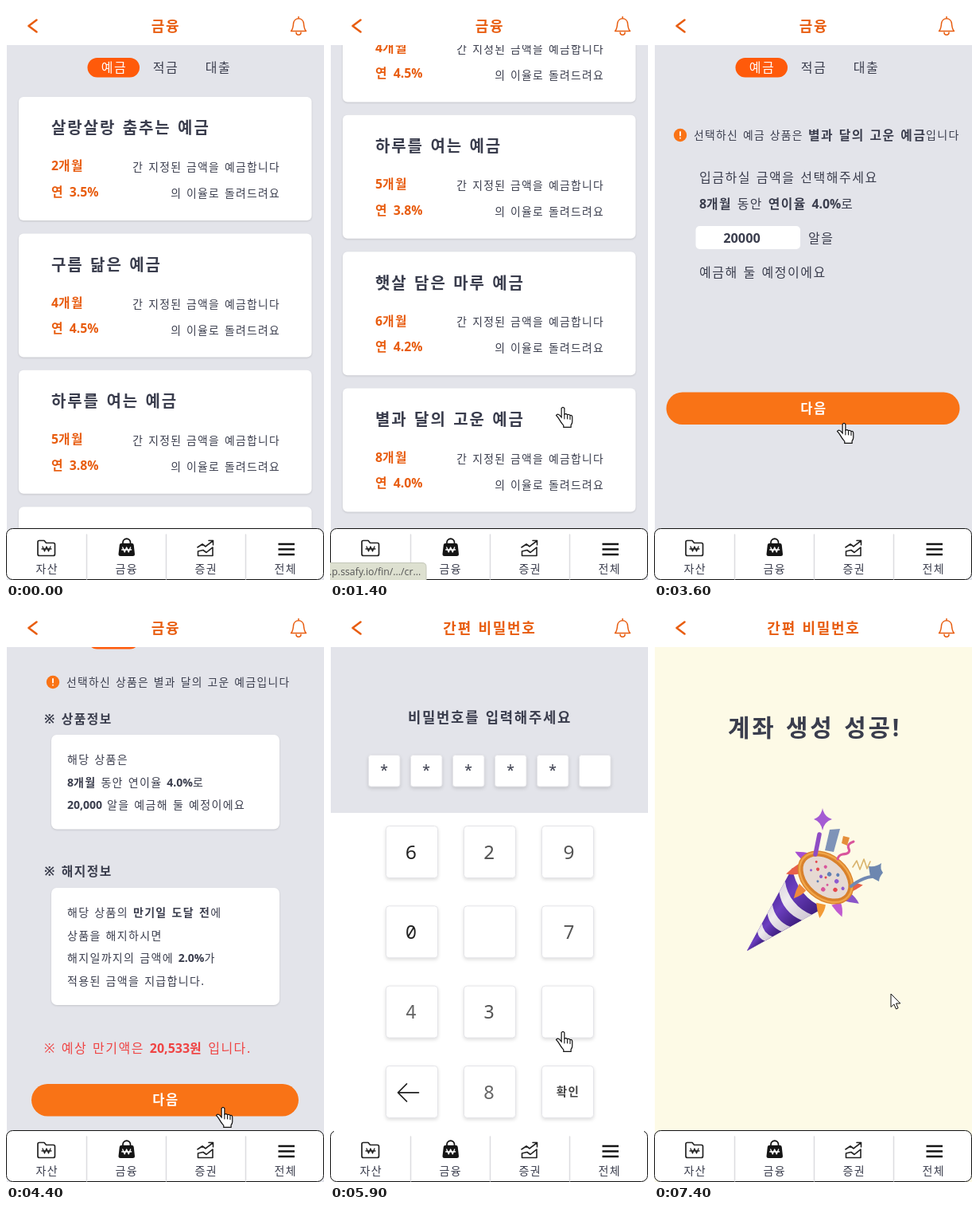
Animation, 400 px wide and 720 px high, one loop 7500 ms. Source, as an HTML page:

```html
<!DOCTYPE html>
<html lang="ko">
<head>
<meta charset="utf-8">
<style>
html, body { margin: 0; width: 100%; height: 100%; overflow: hidden; background: #fff; }
svg { display: block; width: 400px; height: 720px; }
text {
  font-family: "Noto Sans", "Noto Sans CJK KR", "Noto Sans KR", sans-serif;
  letter-spacing: .095em; word-spacing: .07em; white-space: pre;
}
.mono { font-family: "Noto Sans Mono", "Noto Sans CJK KR", monospace; letter-spacing: 0; }
.tip { font-family: "Open Sans", sans-serif; letter-spacing: 0; }
.card { fill: #fff; filter: drop-shadow(0 1px 1px #0002); }
.key { fill: #fff; stroke: #e4e4e8; filter: drop-shadow(0 2px 2px #0002); }
</style>
</head>
<body>
<svg id="stage" viewBox="0 0 400 720"></svg>
<script>
const LOOP = 7500;
const INK = '#3a3d4d', ORANGE = '#e85d10', BUTTON = '#f97316', GRAY = '#e3e4ea';
const PRODUCT = '별과 달의 고운 예금';

// y is the visual middle of the line; [brackets] mark bold, digits are set tight
function text(s, x, y, size, { fill = INK, bold = false, anchor = 'start', cls = '' } = {}) {
  const body = s
    .replace(/[\d.,%]+/g, '<tspan letter-spacing="0">$&</tspan>')
    .replace(/\[(.+?)\]/g, '<tspan font-weight="700">$1</tspan>');
  return `<text x="${x}" y="${y + size * .37}" font-size="${size}" fill="${fill}" class="${cls}"
    font-weight="${bold ? 700 : 400}" text-anchor="${anchor}">${body}</text>`;
}
const mid = (s, x, y, size, opt) => text(s, x, y, size, { anchor: 'middle', ...opt });
const rect = (x, y, w, h, r, attrs) =>
  `<rect x="${x}" y="${y}" width="${w}" height="${h}" rx="${r}" ${attrs}/>`;
const path = (d, attrs) => `<path d="${d}" ${attrs}/>`;
const line = (color, width) =>
  `fill="none" stroke="${color}" stroke-width="${width}" stroke-linecap="round" stroke-linejoin="round"`;
const group = (id, body) => `<g id="${id}">${body}</g>`;

const backdrop = rect(1, 49, 399, 671, 0, `fill="${GRAY}"`);
const tabs = rect(102.5, 65, 65.5, 24.5, 12.2, 'fill="#ff5a0a"') +
  mid('예금', 136, 77, 16, { fill: '#fff' }) + mid('적금', 201, 77, 16) + mid('대출', 267, 77, 16);
const notice = (x, y) => `<circle cx="${x}" cy="${y}" r="8.2" fill="${BUTTON}"/>` +
  path(`M${x} ${y - 4}v4.5M${x} ${y + 3.6}v.1`, line('#fff', 1.8));
const button = (x, y, w) => rect(x, y, w, 40.5, 20.2, `fill="${BUTTON}"`) +
  mid('다음', 201, y + 20, 16.5, { fill: '#fff', bold: true });

function productCard([name, months, rate], i) {
  const y = 114 + i * 171.4;
  const accent = { fill: ORANGE, bold: true }, right = { anchor: 'end' };
  return rect(16, y, 368.5, 155, 6, 'class="card"') +
    text(name, 57, y + 39, 20, { bold: true }) +
    text(months + '개월', 57, y + 86.5, 15.8, accent) +
    text(`연 ${rate}%`, 57, y + 119, 15.8, accent) +
    text('간 지정된 금액을 예금합니다', 345, y + 88, 13.8, right) +
    text('의 이율로 돌려드려요', 345, y + 121, 13.8, right);
}
const products = [
  ['살랑살랑 춤추는 예금', 2, '3.5'], ['구름 닮은 예금', 4, '4.5'], ['하루를 여는 예금', 5, '3.8'],
  ['햇살 담은 마루 예금', 6, '4.2'], [PRODUCT, 8, '4.0']
];
const listPage = backdrop + group('listScroll', tabs + products.map(productCard).join(''));

const formPage = backdrop + tabs + notice(33, 162) +
  text('선택하신 예금 상품은', 50, 162, 13.8) +
  text(PRODUCT, 194, 162, 15.8, { bold: true }) +
  text('입니다', 342, 162, 14) +
  text('입금하실 금액을 선택해주세요', 57, 215, 16) +
  text('[8개월] 동안 [연이율 4.0%]로', 57, 248, 15.8) +
  rect(52.5, 276, 131.5, 29, 5, 'fill="#fff"') +
  `<text id="amount" x="110.5" y="297" font-size="16.3" font-weight="700" fill="${INK}"
    text-anchor="middle" style="letter-spacing:0"></text>` +
  text('알을', 194, 291, 16) + text('예금해 둘 예정이에요', 57, 334, 16) +
  button(15.5, 484.5, 369);

const lines = (y, rows) => rows.map((s, i) => text(s, 77, y + i * 28.6, 14)).join('');
const confirmPage = backdrop + group('confirmScroll', tabs +
  `<g transform="translate(0 38)">` + notice(59, 93) +
  text(`선택하신 상품은 ${PRODUCT}입니다`, 76, 93, 13.8) +
  text('※ 상품정보', 48, 139, 15.8, { bold: true }) +
  rect(57, 159, 287, 118.5, 7, 'class="card"') +
  lines(190, ['해당 상품은', '[8개월] 동안 연이율 [4.0%]로', '[20,000] 알을 예금해 둘 예정이에요']) +
  text('※ 해지정보', 48, 330.5, 15.8, { bold: true }) +
  rect(57, 351, 287, 147, 7, 'class="card"') +
  lines(382, ['해당 상품의 [만기일 도달 전]에', '상품을 해지하시면',
    '해지일까지의 금액에 [2.0%]가', '적용된 금액을 지급합니다.']) +
  text('※ 예상 만기액은 [20,533원] 입니다.', 48, 552, 16, { fill: '#ef4444' }) +
  button(32, 597, 336) + '</g>');

const keys = ['6', '2', '9', '0', '', '7', '4', '3', '', '←', '8', '확인'];
const keyInk = ['#222', '#555', '#555', '#222', '', '#555', '#666', '#555', '', '', '#666', '#444'];
function keyCap(label, i) {
  const x = 70.5 + i % 3 * 98, y = 273.5 + Math.floor(i / 3) * 100.3;
  const face = label === '←'
    ? path(`M${x + 41} ${y + 33.5}h-26m11-11l-11 11l11 11`, line('#222', 1.6))
    : label === '확인'
      ? mid(label, x + 33, y + 32, 14.5, { bold: true, fill: keyInk[i] })
      : mid(label, x + (i % 3 === 2 ? 34 : 31.5), y + 32.5, 24, { cls: 'mono', fill: keyInk[i] });
  return rect(x, y, 65, 65, 4, 'class="key"') + face;
}
const slots = [0, 1, 2, 3, 4, 5].map(i => rect(48.5 + i * 53, 184.5, 39.5, 39.5, 3, 'class="key"') +
  `<text class="mono star" x="${68 + i * 53}" y="211" font-size="20" fill="${INK}" text-anchor="middle">*</text>`);
const pinPage = rect(0, 49, 400, 671, 0, 'fill="#fff"') + rect(1, 49, 399, 208, 0, `fill="${GRAY}"`) +
  mid('비밀번호를 입력해주세요', 201, 137, 17.8, { bold: true }) +
  slots.join('') + keys.map(keyCap).join('');

// Party popper: striped cone nested from its tip, rim, then paper bits
const cone = [1, .84, .71, .56, .45, .33, .23].map((f, i) =>
  path('M0 0L57 -104A62 62 0 0 0 97 -54Z', `fill="url(#${i % 2 ? 'pale' : 'violet'})"
    transform="translate(117 430) scale(${f})"`)).join('');
const spikes = [[183, 327, 75, '#e8604a'], [187, 350, 45, '#f08a3c'], [210, 371, 12, '#f39a35'],
  [229, 371, -18, '#c05ad0'], [242, 362, -55, '#8a55c8'], [245, 351, -95, '#e8604a'], [194, 313, 120, '#a64fd0']]
  .map(([x, y, a, c]) => path('M-6 0Q-3 10 2 18Q7 8 6 0Z',
    `fill="${c}" transform="translate(${x} ${y}) rotate(${a})"`)).join('');
const specks = Array.from({ length: 14 }, (_, i) => {
  const a = i * 2.4, r = Math.sqrt(i / 14);
  const color = ['#e5484d', '#8e5bd0', '#5f7fb5', '#d9559c'][i % 4];
  return `<circle cx="${27 * r * Math.cos(a)}" cy="${16 * r * Math.sin(a)}" r="${1.5 + i % 3 * .6}" fill="${color}"/>`;
}).join('');
const rim = `<g transform="translate(216 338) rotate(40)">
  <ellipse rx="36" ry="25" fill="#e6d9d2" stroke="#d9812b" stroke-width="7"/>
  <ellipse rx="37" ry="26" fill="none" stroke="#f0a548" stroke-width="2.5"/>${specks}</g>`;
const bits =
  path('M212 251Q214 262 224 265Q214 268 212 279Q210 268 201 265Q210 262 212 251Z', 'fill="#a45bd3"') +
  path('M208 284L203 309', line('#8f4dc4', 5.5)) +
  path('M221 278L234 277L226 306L215 304Z', 'fill="#7f93b8"') +
  path('M238 286L246 288L243 298L236 295Z', 'fill="#e58e3a"') +
  path('M251 293q-9 3-6 9t-8 7q-5 1-6 6', line('#d9559c', 3)) +
  path('M250 325l5-8l4 11l5-13l4 12l4-9', line('#d9b36c', 1.6)) +
  path('M248 349Q262 338 274 337', line('#7189b3', 4)) +
  path('M270 324Q280 325 286 320Q284 327 288 332Q283 338 283 343Q277 340 272 337Z', 'fill="#6d87b0"');
const donePage = rect(1, 49, 399, 671, 0, 'fill="#fdfae6"') +
  mid('계좌 생성 성공!', 202, 150, 29.8, { bold: true }) + cone + spikes + rim + group('bits', bits);

const header = rect(0, 0, 400, 49, 0, 'fill="#fff"') +
  path('M38.5 17.5L28.5 25L38.5 32.5', line(ORANGE, 2.6)) +
  path('M368 13.500v1.500M358.500 31.500h19c-3-3-2.600-7-3.200-10.500a6.400 6.400 0 0 0-12.600 0c-.6 3.500-.2 7.500-3.200 10.500z' +
    'M365 33.200a3 3 0 0 0 6 0', line(ORANGE, 1.5)) +
  group('title', '');

const won = (x, y, fill) => path(`M${x - 5} ${y - 3}l2.5 6l2.5-6l2.5 6l2.5-6M${x - 6} ${y}h12`, line(fill, 1.3));
const nav = rect(.5, 655.5, 399, 64, 8, 'fill="#fff" stroke="#111"') +
  [101.5, 201.5, 301.5].map(x => path(`M${x} 663V719`, line('#dcdce0', 1.5))).join('') +
  path('M40 672.5q0-2 2-2h6l2.5 3h9q2 0 2 2v12q0 2-2 2h-17.5q-2 0-2-2z', line('#222', 1.7)) + won(51, 681, '#222') +
  path('M145 674h13.5q2 0 2.2 2l1.3 11.5q0 2.5-2.5 2.5h-15.5q-2.5 0-2.5-2.5l1.3-11.5q.2-2 2.2-2z', 'fill="#151515"') +
  path('M147 676v-3a4.7 4.7 0 0 1 9.5 0v3', line('#151515', 1.8)) + won(151.7, 682, '#fff') +
  path('M241 679l6-4l4 3l9-7m-5-.5h5.5v5.5M241.5 684v5.5h18.5v-10.5l-8 6.5l-4-3z', line('#222', 1.6)) +
  path('M342.5 675h20.5M342.5 681.5h20.5M342.5 688h20.5', 'stroke="#151515" stroke-width="2.5"') +
  ['자산', '금융', '증권', '전체'].map((s, i) => mid(s, 51.7 + i * 100, 706, 14)).join('');

const tip = path('M-1 698.5H116q5 0 5 5V721H-1z', 'fill="#dde0d0" stroke="#c3c6b8"') +
  text('4.p.ssafy.io/fin/.../cr...', -8, 709, 12.3, { cls: 'tip', fill: '#555' });

const hand = '<g transform="scale(1.1)">' +
  path('M-1.7 1.5q1.7-2.5 3.4 0v7q1.7-1.3 3.4.4q1.7-1 3.2.8q2.2-.8 2.4 1.8v5q0 2-1.5 4v2.5' +
    'h-8.5v-2q-2.5-2.5-5-7q-2-3.3-3.4-4.5q1.5-2.6 4 0l2 2.2z', 'fill="#fff" stroke="#111" stroke-width="1.1"') +
  path('M1.7 9v4.5M5 9.5v4M8.2 10.5v3.5', line('#111', 1)) + '</g>';
const arrow = path('M0 0V16.5l3.9-3.5l2.6 6l2.6-1.1l-2.6-5.9h5.3z', 'fill="#fff" stroke="#111"');

const pages = ['list', 'form', 'confirm', 'pin', 'done'];
const stage = document.getElementById('stage');
const gradient = (id, edge, middle, end) => `<linearGradient id="${id}" x1=".2" y1=".2" x2=".8" y2=".8">
  <stop stop-color="${edge}"/><stop offset=".4" stop-color="${middle}"/><stop offset="1" stop-color="${end}"/></linearGradient>`;
stage.innerHTML = '<defs>' + gradient('violet', '#4a2596', '#6c3fc0', '#32166e') +
  gradient('pale', '#d6cfdc', '#efebee', '#c9c0cf') + '</defs>' +
  rect(0, 0, 400, 720, 0, 'fill="#fff"') +
  [listPage, formPage, confirmPage, pinPage, donePage].map((p, i) => group(pages[i], p)).join('') +
  header + nav + group('navCover', rect(5, 654, 390, 3.5, 0, 'fill="#fff"')) + group('tip', tip) +
  group('cursor', group('hand', hand) + group('arrow', arrow));

const $ = id => document.getElementById(id);
const show = (el, on) => el.setAttribute('visibility', on ? 'inherit' : 'hidden');
const stars = [...document.querySelectorAll('.star')];
const titles = ['금융', '간편 비밀번호'].map(s => mid(s, 201, 25, 18, { fill: ORANGE, bold: true }));

const pageStarts = [0, 1800, 3800, 4600, 6300];
const starTimes = [5000, 5200, 5400, 5600, 5900, 6000];
const digitTimes = [2700, 2800, 2900, 3000, 3100];
const listScroll = [[100, 0], [900, 133], [1400, 320]];
const confirmScroll = [[3900, 0], [4200, 38]];
const cursorPath = [[1400, 293, 503], [2200, 293, 503], [2500, 140, 292], [3200, 140, 292], [3600, 239, 523],
  [3800, 239, 523], [4300, 273, 626], [4600, 273, 626], [4900, 102, 312], [5000, 102, 312],
  [5200, 201, 410], [5400, 201, 510], [5600, 293, 531], [5900, 293, 531], [6000, 300, 619],
  [6300, 300, 619], [7100, 298, 484]];

const count = (times, t) => times.filter(s => t >= s).length;

function track(points, t, k = 1) {
  const i = points.findIndex(p => p[0] > t);
  if (i === 0) return points[0][k];
  if (i < 0) return points[points.length - 1][k];
  const a = points[i - 1], b = points[i];
  return a[k] + (b[k] - a[k]) * (t - a[0]) / (b[0] - a[0]);
}

function draw(now) {
  const t = Math.floor(now % LOOP / 100) * 100; // ten pictures a second
  const page = count(pageStarts, t) - 1;
  pages.forEach((id, i) => show($(id), i === page));
  $('title').innerHTML = titles[page < 3 ? 0 : 1];
  $('listScroll').setAttribute('transform', `translate(0 ${-track(listScroll, t)})`);
  $('confirmScroll').setAttribute('transform', `translate(0 ${-track(confirmScroll, t)})`);
  $('amount').textContent = '20000'.slice(0, count(digitTimes, t)) || '0';
  stars.forEach((s, i) => show(s, page === 3 && t >= starTimes[i]));
  show($('navCover'), page === 3);
  show($('tip'), t >= 1400 && t < 2300);

  const burst = track([[6300, .4], [6800, 1]], t);
  const sway = 3 * Math.sin((t - 7400) / 160);
  $('bits').setAttribute('transform',
    `translate(217 338) rotate(${sway}) scale(${burst}) translate(-217 -338)`);

  const pointing = !(t > 2200 && t < 3500) && t < 6300;
  show($('cursor'), t >= 1400);
  $('cursor').setAttribute('transform', `translate(${track(cursorPath, t, 1)} ${track(cursorPath, t, 2)})`);
  show($('hand'), t >= 1400 && pointing);
  show($('arrow'), t >= 1400 && !pointing);
  requestAnimationFrame(() => draw(performance.now() - start));
}
const start = performance.now();
draw(0);
</script>
</body>
</html>
```
